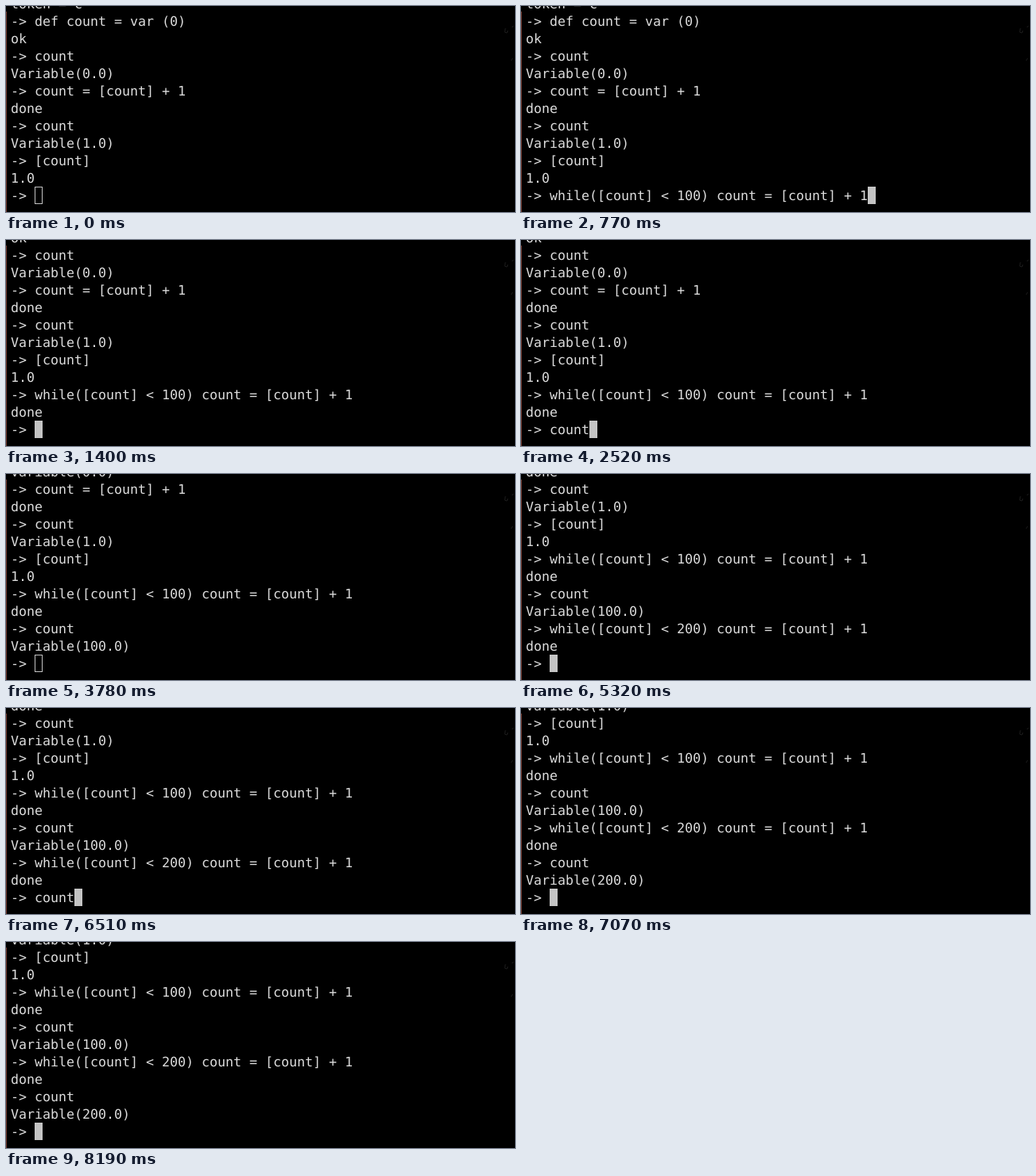
Write an HTML page that moves like this. It is 640 by 260 pixels and loops after 8.54 s.

```html
<!DOCTYPE html>
<html lang="en">
<head>
<meta charset="utf-8">
<title>Terminal session</title>
<style>
  html, body { margin: 0; width: 100%; height: 100%; overflow: hidden; background: #000; }
  svg { display: block; width: 100vw; height: 100vh; }
  text {
    font: 16.61px "DejaVu Sans Mono", Menlo, monospace;
    fill: #dcdcdc;
    white-space: pre;
    text-rendering: geometricPrecision;
  }
</style>
</head>
<body>
<svg viewBox="0 0 640 260">
  <rect width="640" height="260" fill="#000"/>
  <rect y="7" width="1" height="253" fill="#743a30"/>
  <path d="M628 28l-1 5 3 1 1-3M636 27l2-2M635 69l2-3" fill="none" stroke="#1c1c1c"/>
  <g id="screen"></g>
  <rect id="cursor"/>
</svg>
<script>
const LOOP = 8540, ROWS = 12, CELL = 10, LEFT = 6, BASE = 245, PITCH = 22;
const PROMPT = "-> ";

const history = [
  "token = c",
  "-> def count = var (0)", "ok",
  "-> count", "Variable(0.0)",
  "-> count = [count] + 1", "done",
  "-> count", "Variable(1.0)",
  "-> [count]", "1.0"
];

const loopTo = n => `while([count] < ${n}) count = [count] + 1`;

// Each entry: time, text on the input line, then the entered command and its reply.
const steps = [
  [770, loopTo(100)],
  [1400, "", loopTo(100), "done"],
  [1820, "c"], [1960, "cou"], [2240, "coun"], [2310, "count"],
  [2870, "", "count", "Variable(100.0)"],
  [4690, loopTo(200)],
  [5320, "", loopTo(200), "done"],
  [5950, "c"], [6020, "co"], [6090, "cou"], [6300, "coun"], [6440, "count"],
  [7070, "", "count", "Variable(200.0)"]
];

const isFocused = t => t >= 280 && !(t >= 3780 && t < 4410);

const screen = document.getElementById("screen");
const cursor = document.getElementById("cursor");

const rows = Array.from({ length: ROWS }, (_, i) => {
  const row = document.createElementNS("http://www.w3.org/2000/svg", "text");
  row.setAttribute("x", LEFT);
  row.setAttribute("y", BASE - (ROWS - 1 - i) * PITCH);
  return screen.appendChild(row);
});

function setAll(node, attrs) {
  for (const key in attrs) node.setAttribute(key, attrs[key]);
}

function draw(t) {
  const lines = [...history];
  let input = "";
  for (const [at, text, command, reply] of steps) {
    if (t < at) break;
    input = text;
    if (command) lines.push(PROMPT + command, reply);
  }
  lines.push(PROMPT + input);

  const visible = lines.slice(-ROWS);
  rows.forEach((row, i) => {
    if (row.textContent !== visible[i]) row.textContent = visible[i];
  });

  const x = LEFT + (PROMPT.length + input.length) * CELL;
  setAll(cursor, isFocused(t)
    ? { x, y: 228, width: 10, height: 22, fill: "#c4c4c4", stroke: "none" }
    : { x: x + 0.5, y: 228.5, width: 9, height: 21, fill: "none", stroke: "#c4c4c4" });
}

const start = performance.now();
function tick() {
  draw((performance.now() - start) % LOOP);
  requestAnimationFrame(tick);
}
tick();
</script>
</body>
</html>
```
